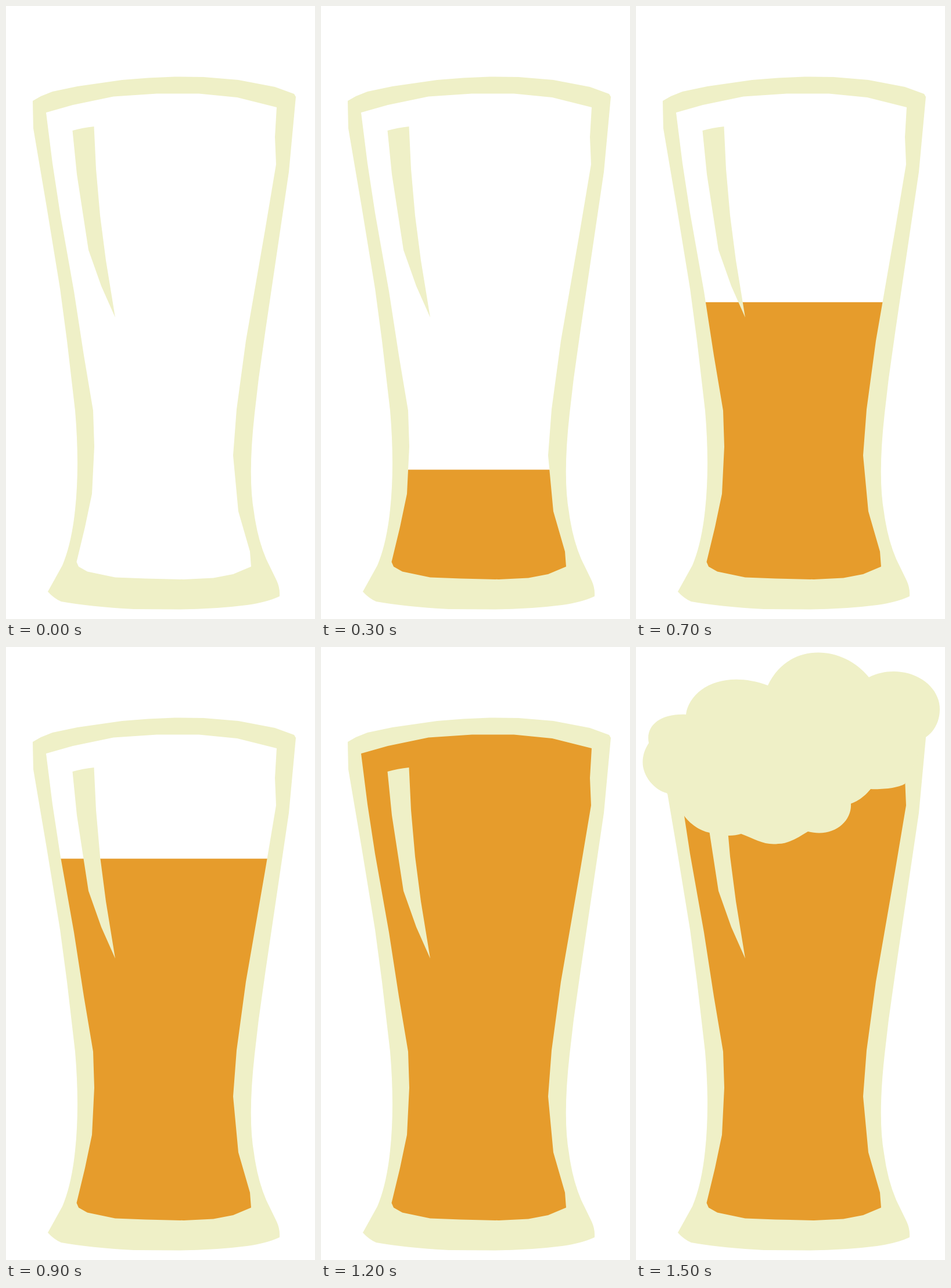
Write an HTML page that moves like this. It is 532 px wide and 1053 px high and loops after 2100 ms.

```html
<!DOCTYPE html>
<html lang="en">
<head>
<meta charset="utf-8">
<title>Filling glass</title>
<style>
  html, body { margin: 0; width: 100%; height: 100%; overflow: hidden; background: #fff; }
  svg { display: block; width: 100%; height: 100%; }
  .cream { fill: #eff0c7; }
  .beer { fill: #e69c2c; animation: fill 2100ms infinite; }
  .foam { animation: show 2100ms step-end infinite, rise 2100ms infinite; }

  @keyframes fill {
    0% { transform: translateY(1053px); animation-timing-function: step-end; }
    4.7619% { transform: translateY(939px); animation-timing-function: steps(4); }
    23.8095% { transform: translateY(654px); animation-timing-function: steps(10); }
    71.4285%, 100% { transform: translateY(-72px); }
  }
  @keyframes show {
    0% { visibility: hidden; }
    61.9047%, 100% { visibility: visible; }
  }
  @keyframes rise {
    0%, 61.9047% {
      animation-timing-function: steps(2);
      d: path("M46 180 C42 175 38 168 38 161 C38 157 39 153 41 150 C48 136 70 128 103 130 C98 88 165 72 238 96 C268 58 352 58 397 100 C448 86 505 108 505 138 C505 145 503 150 499 155 L466 173 C455 186 437 194 417 194 C406 194 396 194 386 193 C364 200 346 205 318 205 C308 205 299 204 290 202 C281 200 271 198 262 195 C240 198 208 196 190 191 C172 187 157 178 148 163 Z");
    }
    71.4285%, 100% {
      d: path("M53 251 C32 246 11.5 222 11.5 198 C11.5 185 16 174 22 165 C16 135 42 114 86 116 C92 72 150 38 227 66 C262 -9 355 -5 401 52 C455 25 523 56 523 107 C523 127 514 145 499 155 L463 235 C452 242 425 245 404 244 C394 256 384 264 370 269 C372 300 340 328 296 317 C278 328 262 338 245 338 C221 341 205 330 181 321 C165 326 145 324 127 319 C110 316 92 303 83 290 Z");
    }
  }
</style>
</head>
<body>
<svg viewBox="0 0 532 1053">
  <clipPath id="inside">
    <path d="M57 175 L260 136 L482 160 L425 580 L406 770 L440 975 L300 1000 L125 985 L108 960 L138 780 L110 560 Z"/>
  </clipPath>
  <g clip-path="url(#inside)">
    <rect class="beer" width="532" height="1200"/>
  </g>
  <!-- outer wall, then the opening -->
  <path class="cream" fill-rule="evenodd" d="
    M46 163 L60 155 L80 147 L123 138 L200 127 L245 123.5 L290 121.5 L340 122 L400 127 L463 139 L496 151 L499 156
    L487 285 L463 447 L447 555 L435 640 L428 700 Q416 808 427 870 Q433 915 448 950 L466 987 Q472 1000 471 1014
    Q450 1024 415 1029 Q360 1036 300 1036.5 L220 1036 Q145 1032 95 1023 Q83 1018 72 1006
    L97 961 Q113 923 119 865 Q127 790 119 695 L105 575 L93 485 L70 345 L47 210 Z
    M69 183 L115 170 L185 155.5 L260 150.5 L332 150.5 L398 157 L466 174 L463 225 L465 272 L446 385 L413 575
    L397 693 L391 772 L400 868 L420 937 L422 963 L391 976 L357 982.5 L306 985 L240 983.5 L188 981.5 L140 971.5
    L125 963 L121.5 955 L136 895 L148 838 L152 757 L150 695 L134 600 L117 490 L93 355 L80 270 Z"/>
  <path class="cream" d="M114.5 214 Q132 209 151.5 207 L155 280 L162 360 L172 437 L188 535 L164 481 L142 419 L122 289 Z"/>
  <path class="cream foam"/>
</svg>
</body>
</html>
```
